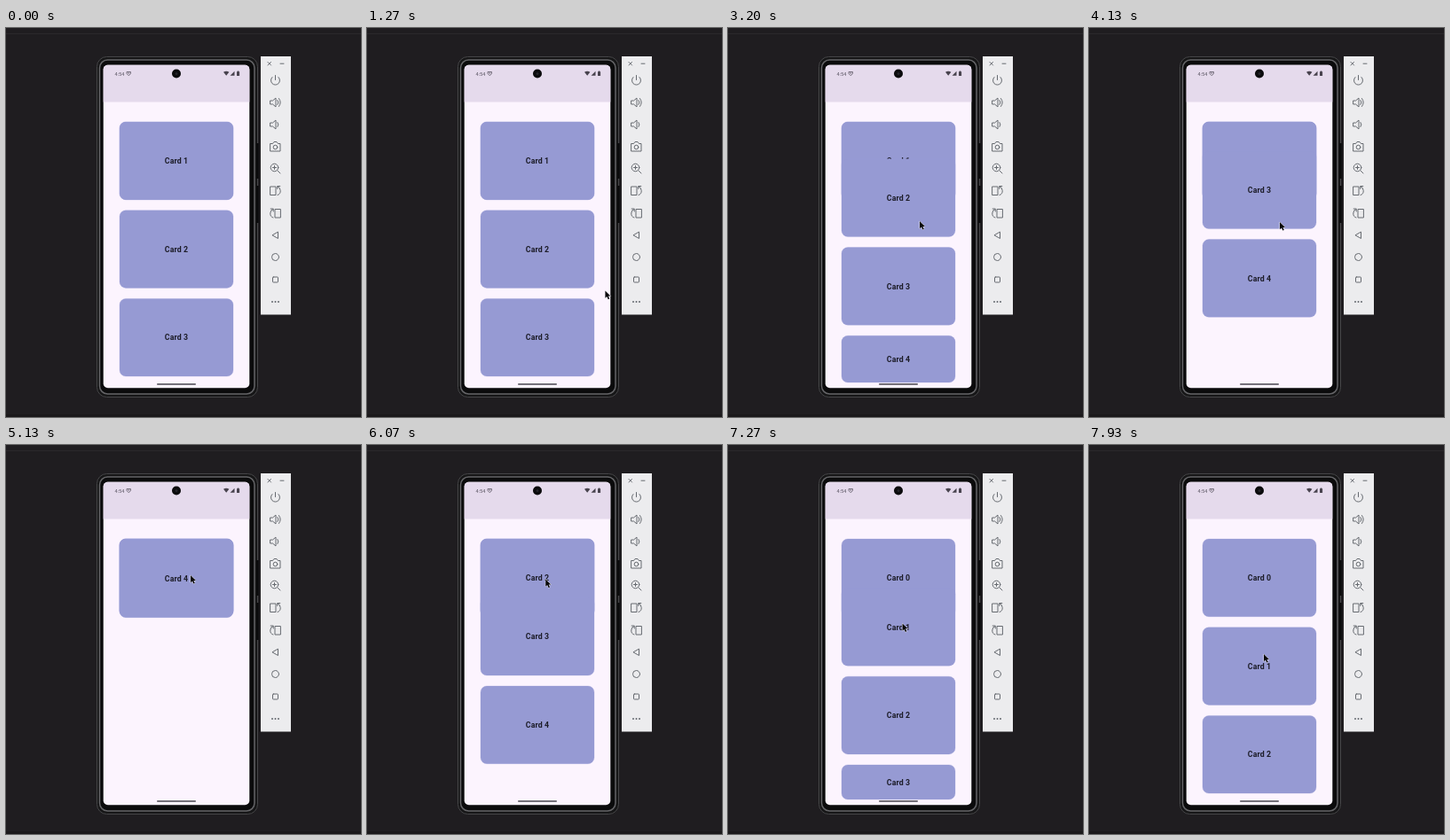
Write an HTML page that moves like this. It is 400 px wide and 439 px high and loops after 8 s.

```html
<!DOCTYPE html>
<html lang="en">
<head>
<meta charset="utf-8">
<title>Stacking cards</title>
<style>
  html, body { margin: 0; width: 100%; height: 100%; overflow: hidden; background: #1f1d20; }
  svg { display: block; width: 100vw; height: 100vh; }
  text { font-family: Roboto, sans-serif; }
  .card { fill: #969ad3; stroke: #969ad3; stroke-opacity: .3; }
  .label { font-size: 8.8px; font-weight: 600; letter-spacing: .1px; text-anchor: middle; fill: #1c1c28; }
  .icons { fill: none; stroke: #666a70; stroke-linecap: round; stroke-linejoin: round; }
</style>
</head>
<body>
<svg viewBox="0 0 400 439">
  <defs>
    <clipPath id="screen"><rect x="109.700" y="41.700" width="164.600" height="364.600" rx="5"/></clipPath>
  </defs>
  <rect width="400" height="439" fill="#1f1d20"/>
  <rect y="6" width="400" height="1" fill="#2a282b"/>
  <rect y="436" width="400" height="3" fill="#1a181a"/>

  <!-- phone body -->
  <rect x="102.500" y="32.500" width="181" height="384" rx="11" fill="#161617" stroke="#464648"/>
  <rect x="105.500" y="36" width="174.500" height="377" rx="9" fill="#0b0b0c" stroke="#646467" stroke-width="1.500"/>
  <path d="M283.500 130v40M283.500 178v42" stroke="#0a0a0b" stroke-width="2.500"/>

  <g clip-path="url(#screen)">
    <rect x="109" y="41" width="166" height="366" fill="#fcf4fe"/>
    <rect x="109" y="41" width="166" height="42.500" fill="#e5daec"/>
    <g id="cards"></g>
    <rect x="170" y="401.200" width="44" height="1.500" rx=".75" fill="#48454e"/>
  </g>

  <!-- status bar -->
  <text x="122.500" y="53.500" font-size="5.600" fill="#5a5562">4:54</text>
  <path d="M136 49.500h4.500v2l-2.200 2.300-2.300-2.300zM137 51h2.500" fill="none" stroke="#6e6875" stroke-width=".9"/>
  <path d="M245 49.700q3.200-2 6.400 0l-3.200 4zM252.500 53.700l5-5v5zM260 49.300h.8v-.8h1.500v.8h.8v4.700h-3.100z" fill="#48434e"/>
  <circle cx="192" cy="51.500" r="5" fill="#0b0b0d"/>
  <circle cx="192" cy="51.500" r="1.500" fill="#24242a"/>

  <!-- emulator toolbar -->
  <rect x="287" y="32" width="34" height="291.500" fill="#ececee"/>
  <g class="icons">
    <path d="M295 38.500l3.500 3.500M298.500 38.500l-3.500 3.500M309 40.200h4"/>
    <path d="M303.500 53.500v5M300 55.500a5 5 0 1 0 7 0"/>
    <g id="speaker"><path d="M298 82h2.500l3.500-3v10l-3.500-3h-2.500zM306 81.500q2 2.500 0 5"/></g>
    <path d="M307.500 79.500q3.500 4.500 0 9"/>
    <use href="#speaker" y="25"/>
    <path d="M298 130.500h2.500l1.500-2h3l1.500 2h2.500v8.500h-11z"/><circle cx="303.500" cy="134.500" r="2.300"/>
    <circle cx="302.500" cy="157.500" r="4.300"/><path d="M305.700 160.700l3.300 3.300M300.500 157.500h4M302.500 155.500v4"/>
    <g id="rotate"><path d="M298 179h6v9.500h-6zM306 188.500q3.500-1 3.200-5t-3.200-4.500M305.800 181.500v-3h3"/></g>
    <use href="#rotate" transform="translate(607 25.500) scale(-1 1)"/>
    <path d="M306.500 230.500v7l-6.200-3.500z"/>
    <circle cx="303.500" cy="258.500" r="4"/>
    <rect x="300.500" y="281" width="6" height="6" rx=".8"/>
    <path d="M300 309h.01M303.500 309h.01M307 309h.01" stroke-width="2"/>
  </g>

  <path id="cursor" d="M0 0v8.200l1.900-1.700 1.400 3.100 1.500-.7-1.400-3h2.600z" fill="#08080a" stroke="#f4f2fa" stroke-width=".9" paint-order="stroke"/>
</svg>
<script>
const LOOP = 8000, TOP = 106, STEP = 99.7, HEIGHT = 87.7, BOTTOM = 400;
const CURSOR_ENTERS = 750;

// Poses of the gesture; scroll is measured in cards.
const POSES = [
  { time: 0, scroll: 1, x: 310, y: 300 },
  { time: 1650, scroll: 1, x: 262, y: 296 },
  { time: 2070, scroll: 0.84, x: 260, y: 311 },
  { time: 3200, scroll: 1.58, x: 216, y: 218 },
  { time: 4130, scroll: 2.67, x: 215, y: 219 },
  { time: 5130, scroll: 3.99, x: 208, y: 147 },
  { time: 6870, scroll: 1.04, x: 196, y: 155 },
  { time: 7600, scroll: 0, x: 197, y: 236 },
  { time: LOOP, scroll: 0, x: 197, y: 236 }
];

function poseAt(time) {
  const next = POSES.findIndex(pose => pose.time > time);
  const from = POSES[next - 1], to = POSES[next];
  const u = (time - from.time) / (to.time - from.time);
  const eased = u * u * (3 - 2 * u);
  const mix = key => from[key] + (to[key] - from[key]) * eased;
  return { scroll: mix("scroll"), x: mix("x"), y: mix("y") };
}

function add(parent, name, attributes = {}) {
  const node = document.createElementNS("http://www.w3.org/2000/svg", name);
  for (const key in attributes) node.setAttribute(key, attributes[key]);
  return parent.appendChild(node);
}

const cardLayer = document.getElementById("cards");
const cursor = document.getElementById("cursor");
const cards = Array.from({ length: 5 }, (_, index) => {
  const group = add(cardLayer, "g");
  const box = add(group, "rect", { x: 128, width: 128, rx: 7, class: "card" });
  const label = add(group, "text", { x: 192, class: "label" });
  label.textContent = "Card " + index;
  return { group, box, label };
});

// Cards scroll up until they pin at TOP; the lowest one shrinks to fit above BOTTOM.
function draw(time) {
  const pose = poseAt(time);
  cards.forEach(({ group, box, label }, index) => {
    const y = TOP + Math.max(0, index - pose.scroll) * STEP;
    const height = Math.max(0, Math.min(HEIGHT, BOTTOM - y));
    group.style.display = height ? "" : "none";
    box.setAttribute("y", y);
    box.setAttribute("height", height);
    label.setAttribute("y", y + height / 2 + 3.2);
    label.style.opacity = height > 8 ? 1 : 0;
  });
  cursor.style.display = time < CURSOR_ENTERS ? "none" : "";
  cursor.setAttribute("transform", `translate(${pose.x} ${pose.y})`);
}

const start = performance.now();
function tick() {
  draw((performance.now() - start) % LOOP);
  requestAnimationFrame(tick);
}
tick();
</script>
</body>
</html>
```
